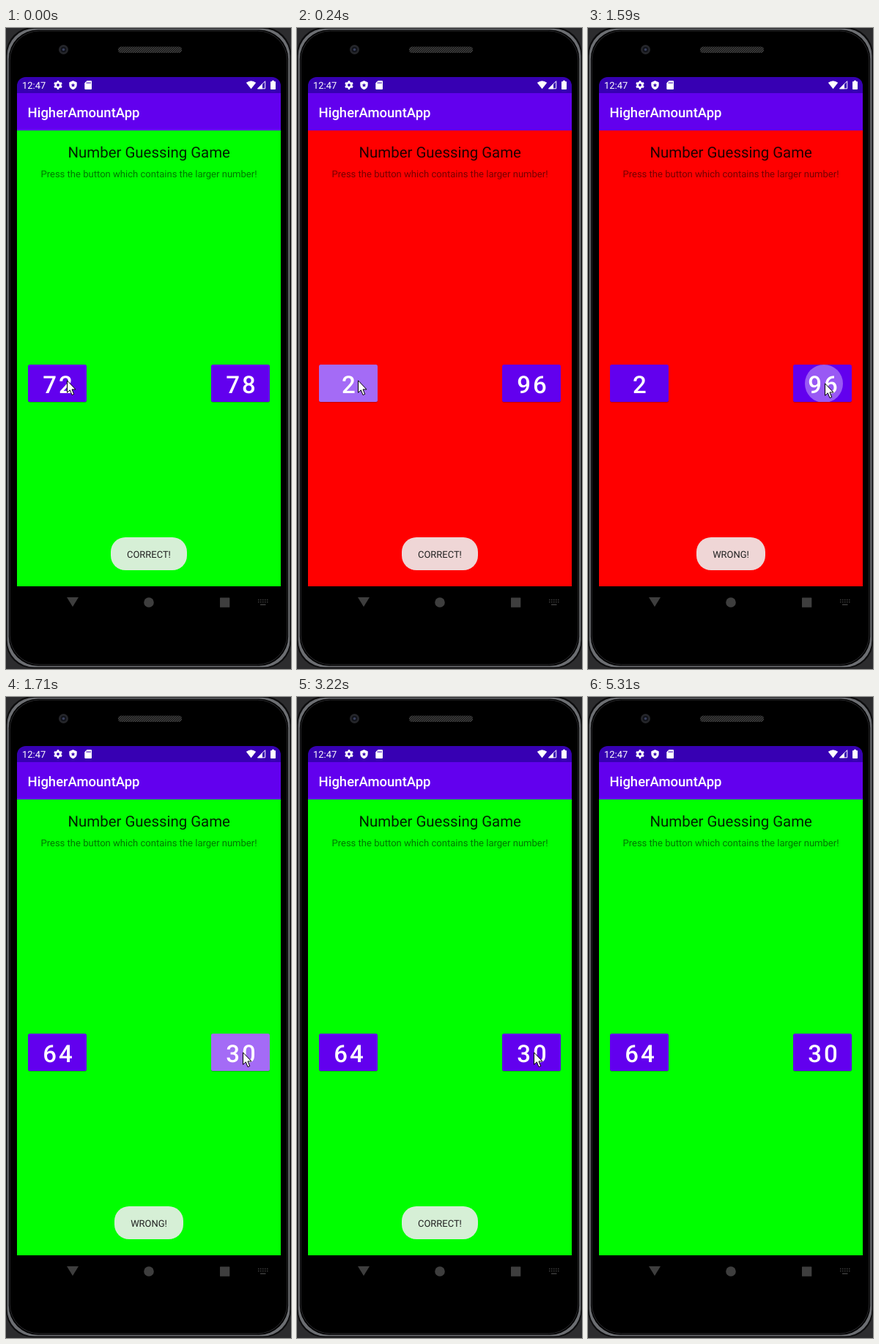
An HTML page for the animation above (5810 ms loop, 389x876 px).

```html
<!DOCTYPE html>
<html lang="en">
<head>
<meta charset="utf-8">
<title>Number Guessing Game</title>
<style>
html, body { margin: 0; width: 100%; height: 100%; overflow: hidden; background: #2c2c2e; }
svg { display: block; width: 389px; height: 876px; font-family: Roboto, sans-serif; text-rendering: geometricPrecision; }
.mid { text-anchor: middle; }
.num { font-size: 33px; font-weight: 500; letter-spacing: 3px; fill: #fff; }
.btn { fill: #6200ee; filter: drop-shadow(0 1px .6px rgba(0,0,0,.22)); }
.toast rect { fill: #eee; fill-opacity: .902; }
.toast text { font-size: 12.95px; fill: #222; }
</style>
</head>
<body>
<svg viewBox="0 0 389 876">
  <defs>
    <pattern id="mesh" width="3" height="3" patternUnits="userSpaceOnUse">
      <rect width="3" height="3" fill="#1b1b1b"/>
      <path d="M0 3L3 0" stroke="#505050" stroke-width=".9"/>
    </pattern>
    <clipPath id="clipL"><rect x="30" y="460" width="80" height="51" rx="2.5"/></clipPath>
    <clipPath id="clipR"><rect x="280" y="460" width="80" height="51" rx="2.5"/></clipPath>
  </defs>

  <!-- phone body -->
  <rect x="0" y="-1" width="389" height="876" rx="37" fill="#0c0c0d"/>
  <rect x="1.500" y=".8" width="386" height="872.700" rx="37" fill="#6c6e72"/>
  <rect x="3.800" y="2.400" width="381.400" height="869.400" rx="40" fill="#000"/>
  <rect x="5.300" y="4" width="378.400" height="866" rx="40" fill="#000" stroke="#2a2a2d"/>
  <circle cx="78.5" cy="29.5" r="6.5" fill="#25262a"/>
  <circle cx="78.5" cy="29.5" r="3.8" fill="#11131a"/>
  <circle cx="78.5" cy="29.5" r="1.8" fill="#39405c"/>
  <rect x="153" y="25.500" width="87" height="8.500" rx="4" fill="url(#mesh)"/>

  <!-- screen -->
  <path d="M15 90V79A12 12 0 0 1 27 67H363A12 12 0 0 1 375 79V90Z" fill="#3700b3"/>
  <rect x="15" y="89" width="360" height="52" fill="#6200ee"/>
  <rect id="page" x="15" y="140" width="360" height="623"/>

  <!-- status bar -->
  <g fill="#fff">
    <text x="22" y="83" font-size="12.95">12:47</text>
    <g fill="none" stroke="#fff">
      <circle cx="71" cy="78" r="3.300" stroke-width="2.800"/>
      <circle cx="71" cy="78" r="5" stroke-width="1.800" pathLength="12" stroke-dasharray="1 1" stroke-dashoffset="1.500"/>
    </g>
    <path d="M91.5 72L96.7 74.2V78Q96.5 82.4 91.5 84.2Q86.5 82.4 86.3 78V74.2Z"/>
    <path d="M91.5 75.3L92.3 77.2L94.3 77.4L92.8 78.7L93.3 80.7L91.5 79.6L89.7 80.7L90.2 78.7L88.7 77.4L90.7 77.2Z" fill="#3700b3"/>
    <path d="M110.5 72H116Q117 72 117 73V83Q117 84 116 84H108.3Q107.3 84 107.3 83V75.2Z"/>
    <path d="M110.7 73.7V76.2M112.8 73.7V76.2M114.9 73.7V76.2" stroke="#3700b3"/>
    <path d="M327.8 74.8Q334.5 69.6 341.2 74.8L334.5 83.3Z"/>
    <path d="M343.6 82.8H353.7V72.7Z" fill="none" stroke="#fff"/>
    <path d="M343 83.3H350V76.3Z"/>
    <path d="M363 73V71.8H366V73H367.2Q368 73 368 73.8V83.2Q368 84 367.2 84H361.8Q361 84 361 83.2V73.8Q361 73 361.8 73Z"/>
  </g>
  <text x="29.5" y="122" font-size="18.5" font-weight="500" fill="#fff">HigherAmountApp</text>

  <text class="mid" x="195.200" y="177" font-size="20.4" fill-opacity=".87">Number Guessing Game</text>
  <text class="mid" x="195" y="204" font-size="13.05" fill-opacity=".54">Press the button which contains the larger number!</text>

  <!-- number buttons -->
  <rect class="btn" x="30" y="460" width="80" height="51" rx="2.5"/>
  <rect class="btn" x="280" y="460" width="80" height="51" rx="2.5"/>
  <text id="left" class="num mid" x="71.900" y="498.800"></text>
  <text id="right" class="num mid" x="321.900" y="498.800"></text>
  <g clip-path="url(#clipL)"><circle id="rippleL" cx="82" cy="486" fill="#fff"/></g>
  <g clip-path="url(#clipR)"><circle id="rippleR" cx="322" cy="486" fill="#fff"/></g>

  <g id="wrong" class="toast">
    <rect x="148" y="696" width="94" height="45" rx="20"/>
    <text class="mid" x="195" y="723.8">WRONG!</text>
  </g>
  <g id="correct" class="toast">
    <rect x="143" y="696" width="104" height="45" rx="20"/>
    <text class="mid" x="195" y="723.8">CORRECT!</text>
  </g>

  <!-- navigation bar -->
  <g fill="#3e3e3e">
    <path d="M83 778H99L91 791Z"/>
    <circle cx="195" cy="785" r="6.8"/>
    <rect x="292" y="778.5" width="13.3" height="13.3" rx=".6"/>
    <path d="M344 781.5H357.5M344 784.5H357.5" stroke="#3e3e3e" stroke-width="1.5" stroke-dasharray="1.5 1.5"/>
    <path d="M347 787.3H354.5V788.8H347Z"/>
  </g>

  <path id="cursor" d="M.5 .8V17.3L4.3 13.8L7 20.5L9.7 19.4L7 12.9H12Z" fill="#fff" stroke="#000" stroke-width="1" stroke-linejoin="round"/>
</svg>
<script>
const LOOP = 5810;
const GREEN = "#00ff00", RED = "#ff0000";
const none = [0, 0], touch = [26, .35], full = [95, .42], fading = [95, .2];

// Each step lists only what changes at time t.
// Ripples are [radius, opacity]; toasts are opacities.
const steps = [
  { t: 0, page: GREEN, nums: [72, 78], rippleL: none, rippleR: none, correct: 1, wrong: 0, cursor: [83, 481] },
  { t: 120, rippleL: touch },
  { t: 240, page: RED, nums: [2, 96], rippleL: full },
  { t: 360, rippleL: fading },
  { t: 480, rippleL: none, cursor: [142, 486] },
  { t: 620, cursor: [262, 486] },
  { t: 740, cursor: [323, 485] },
  { t: 980, correct: 1, wrong: .12 },
  { t: 1100, correct: .6, wrong: .6 },
  { t: 1220, correct: .15, wrong: 1 },
  { t: 1340, correct: 0, wrong: 1 },
  { t: 1590, rippleR: touch },
  { t: 1710, page: GREEN, nums: [64, 30], rippleR: full },
  { t: 1830, rippleR: fading },
  { t: 1950, rippleR: none },
  { t: 2830, correct: .12, wrong: 1 },
  { t: 2950, correct: .6, wrong: .6 },
  { t: 3100, correct: 1, wrong: .12 },
  { t: 3220, correct: 1, wrong: 0 },
  { t: 4530, cursor: [323, 486] },
  { t: 4650, cursor: [319, 492] },
  { t: 4770, cursor: [311, 500] },
  { t: 4920, correct: .85, cursor: [310, 662] },
  { t: 5070, correct: .45, cursor: [324, 838] },
  { t: 5190, correct: .1, cursor: [324, 900] },
  { t: 5310, correct: 0 }
];

const el = id => document.getElementById(id);
const set = (id, attrs) => {
  for (const key in attrs) el(id).setAttribute(key, attrs[key]);
};
const ripple = (id, [r, opacity]) => set(id, { r, opacity });

function draw(state) {
  set("page", { fill: state.page });
  el("left").textContent = state.nums[0];
  el("right").textContent = state.nums[1];
  ripple("rippleL", state.rippleL);
  ripple("rippleR", state.rippleR);
  set("correct", { opacity: state.correct });
  set("wrong", { opacity: state.wrong });
  set("cursor", { transform: `translate(${state.cursor})` });
}

let shown = -1;
const start = performance.now();
function tick() {
  const time = Math.max(0, performance.now() - start) % LOOP;
  const active = steps.filter(step => step.t <= time);
  if (active.length !== shown) {
    shown = active.length;
    draw(Object.assign({}, ...active));
  }
  requestAnimationFrame(tick);
}
tick();
</script>
</body>
</html>
```
